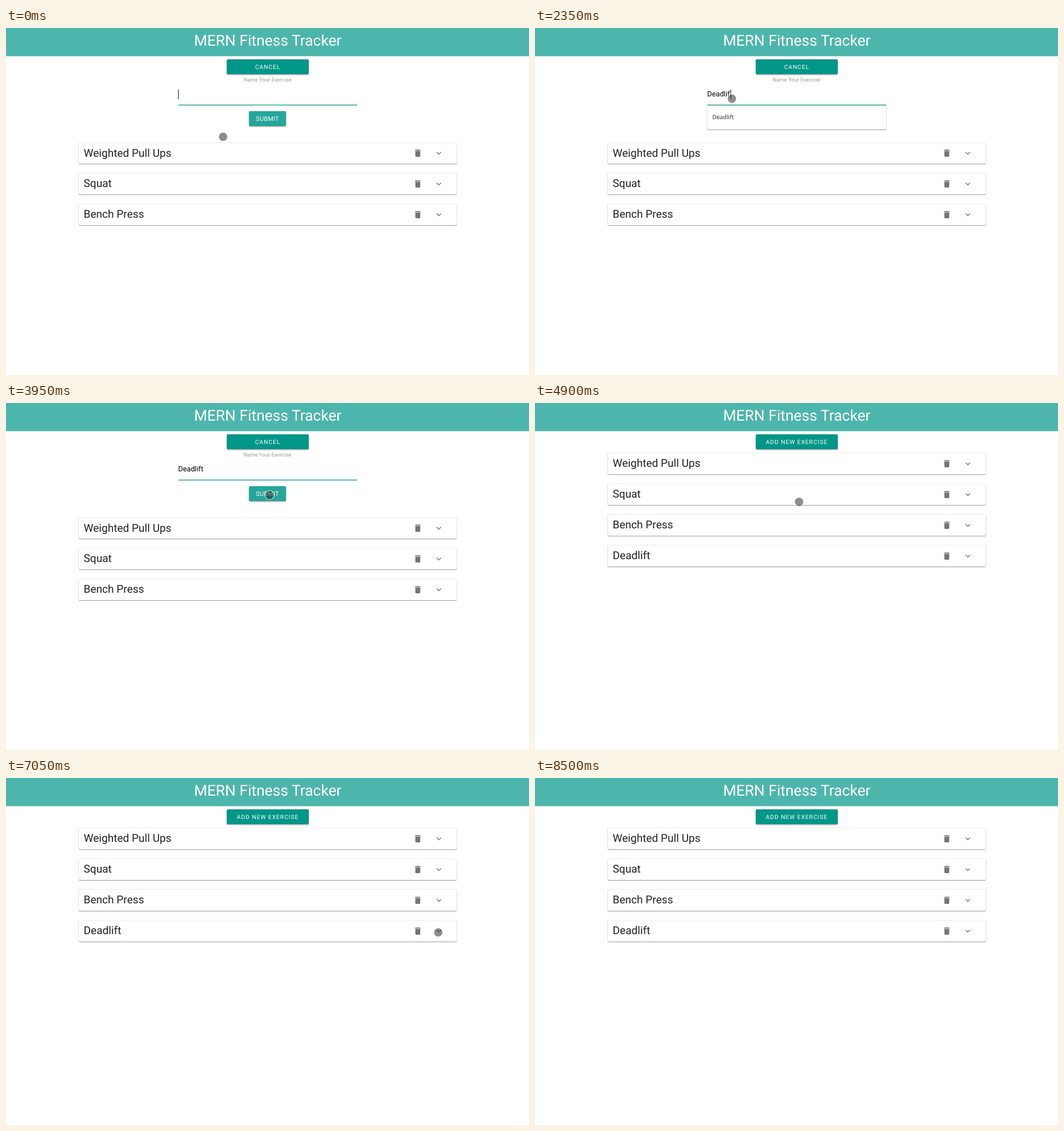
These frames come from a looping animation (919 by 609 pixels, 8.55 s). An HTML page:

```html
<!DOCTYPE html>
<html lang="en">
<head>
<meta charset="utf-8">
<title>Fitness Tracker</title>
<style>
html, body { margin: 0; width: 100%; height: 100%; overflow: hidden; background: #fff; }
body { position: relative; font-family: Roboto, sans-serif; color: rgba(0,0,0,.87); text-rendering: geometricPrecision; }
div, svg { position: absolute; white-space: pre; }
#bar { left: 0; top: 0; width: 919px; height: 50px; background: linear-gradient(#4db6ac 49px, #a6dad5 49px);
  color: #fff; font-size: 26.45px; line-height: 46px; text-align: center; text-indent: 1px; }
.btn { border-radius: 2px; color: #fff; text-align: center;
  box-shadow: 0 1.2px 1.6px rgba(0,0,0,.3), 0 .8px 3px rgba(0,0,0,.2); }
#toggle { left: 388px; top: 55px; width: 144px; height: 26px; background: #009688;
  font-size: 10.3px; letter-spacing: .95px; line-height: 27px; }
#submit { left: 427px; top: 146px; width: 65px; height: 26px; background: #26a69a;
  font-size: 10.9px; letter-spacing: .25px; line-height: 27px; }
#label { left: 0; top: 82px; width: 919px; line-height: 20px; font-size: 9.45px; text-align: center; color: #9e9e9e; }
#input { left: 302.5px; top: 107px; line-height: 20px; font-size: 12.8px; color: #000; }
#line { left: 302.5px; top: 134px; width: 314.5px; height: 2px; background: linear-gradient(#93d3cd 50%, #26a69a 50%); }
#caret { top: 108px; width: 2px; height: 17px; background: rgba(0,0,0,.5); }
.paper { background: #fff; border-radius: 2px; box-shadow: 0 1px 1.2px rgba(0,0,0,.36), 0 0 1.6px rgba(0,0,0,.3); }
#menu { left: 302.5px; top: 136px; width: 314.5px; padding: 0 9px; box-sizing: border-box;
  font: 10.3px/42.3px "Noto Sans", "Open Sans", sans-serif; color: #333; }
.card { left: 128px; width: 664px; }
.card div { left: 8.5px; line-height: 35px; font-size: 19.1px; }
.card svg { top: 9.9px; width: 17.2px; height: 17.2px; fill: rgba(0,0,0,.54); }
.bin { left: 587.4px; }
.arrow { left: 623.9px; }
#dot { left: -8.5px; top: -8.5px; width: 15px; height: 15px; border-radius: 50%;
  border: 1px solid rgba(255,255,255,.7); background: rgba(30,30,30,.5); background-clip: padding-box; }
#cross { left: 338.5px; top: 116.5px; width: 14px; height: 14px; }
</style>
</head>
<body>
<div id="bar">MERN Fitness Tracker</div>
<div id="toggle" class="btn"></div>
<div id="form">
  <div id="label">Name Your Exercise</div>
  <div id="input"></div>
  <div id="caret"></div>
  <div id="line"></div>
  <div id="submit" class="btn">SUBMIT</div>
  <div id="menu" class="paper"></div>
</div>
<div id="list"></div>
<svg id="cross" viewBox="-7 -7 14 14"><path d="M0-6.5L3-3H.9V-.9H3V-3L6.5 0 3 3V.9H.9V3H3L0 6.5-3 3H-.9V.9H-3V3L-6.5 0-3-3V-.9H-.9V-3H-3Z"/></svg>
<div id="dot"></div>
<script>
const LOOP = 8550, TICK = 50, WORD = 'Deadlift';
// pointer glides: start, end, x, y
const GLIDES = [
  [250, 650, 345.5, 123.5], [2950, 3000, 244, 6], [3150, 3200, 292, 34], [3300, 3950, 462.5, 161],
  [4650, 4900, 463.5, 173], [4900, 5200, 592, 261], [5300, 5600, 759, 270.5],
  [7300, 7500, 583, 146], [7550, 7850, 368, 65], [7900, 8500, 86, -12]
];
const el = id => document.getElementById(id);
const show = (node, on) => node.style.visibility = on ? 'visible' : 'hidden';
const setText = (node, text) => { if (node.textContent !== text) node.textContent = text; };
const within = (t, from, to) => t >= from && t < to;

el('list').innerHTML = ['Weighted Pull Ups', 'Squat', 'Bench Press', WORD].map(name =>
  `<div class="card paper"><div>${name}</div>
  <svg class="bin" viewBox="0 0 24 24"><path d="M6 19c0 1.1.9 2 2 2h8c1.1 0 2-.9 2-2V7H6v12zM19 4h-3.5l-1-1h-5l-1 1H5v2h14V4z"/></svg>
  <svg class="arrow" viewBox="0 0 24 24"><path d="M16.59 8.59L12 13.17 7.41 8.59 6 10l6 6 6-6z"/></svg></div>`).join('');
const cards = [...document.querySelectorAll('.card')];
const pen = document.createElement('canvas').getContext('2d');
pen.font = '12.8px Roboto, sans-serif';

// five quick keys, then a slower pace
const typedCount = t => t < 2050
  ? Math.max(0, Math.floor((t - 1500) / 100))
  : 5 + Math.floor((t - 1950) / 200);

function pointer(t) {
  let x = 381, y = 190.5;
  for (const [start, end, toX, toY] of GLIDES) {
    const p = Math.min(1, Math.max(0, (t - start) / (end - start)));
    x += (toX - x) * p;
    y += (toY - y) * p;
  }
  return [x, y];
}

function draw(t) {
  const adding = t < 4350;
  const typed = WORD.slice(0, typedCount(t));
  const crossed = within(t, 1500, 1600);
  const open = within(t, 5950, 7050);

  setText(el('toggle'), adding ? 'CANCEL' : 'ADD NEW EXERCISE');
  el('form').style.display = adding ? 'block' : 'none';
  setText(el('input'), typed);
  show(el('caret'), t < 300 || within(t, 550, 1050) || within(t, 1600, 2650));
  el('caret').style.left = 302 + Math.ceil(pen.measureText(typed).width) + 'px';
  setText(el('menu'), typed.length === 1 ? 'Deadlift\nDips\nDumbbell Row' : WORD);
  show(el('menu'), typed && t < 2750);
  el('menu').style.opacity = t < 2650 ? 1 : .5;

  cards.forEach((card, i) => {
    const last = i === 3;
    card.style.top = (adding ? 201.5 : 88.2) + 53.9 * i + 'px';
    card.style.height = last && open ? '266px' : '36.8px';
    show(card, !last || t >= 4450);
  });
  cards[3].querySelector('.arrow').style.transform = open ? 'rotate(180deg)' : '';

  const [x, y] = pointer(t);
  el('dot').style.transform = `translate(${x}px, ${y}px)`;
  show(el('dot'), !crossed);
  show(el('cross'), crossed);
}

const begin = performance.now();
function tick() {
  const t = (performance.now() - begin) % LOOP;
  draw(Math.floor(t / TICK) * TICK);
  requestAnimationFrame(tick);
}
tick();
</script>
</body>
</html>
```
